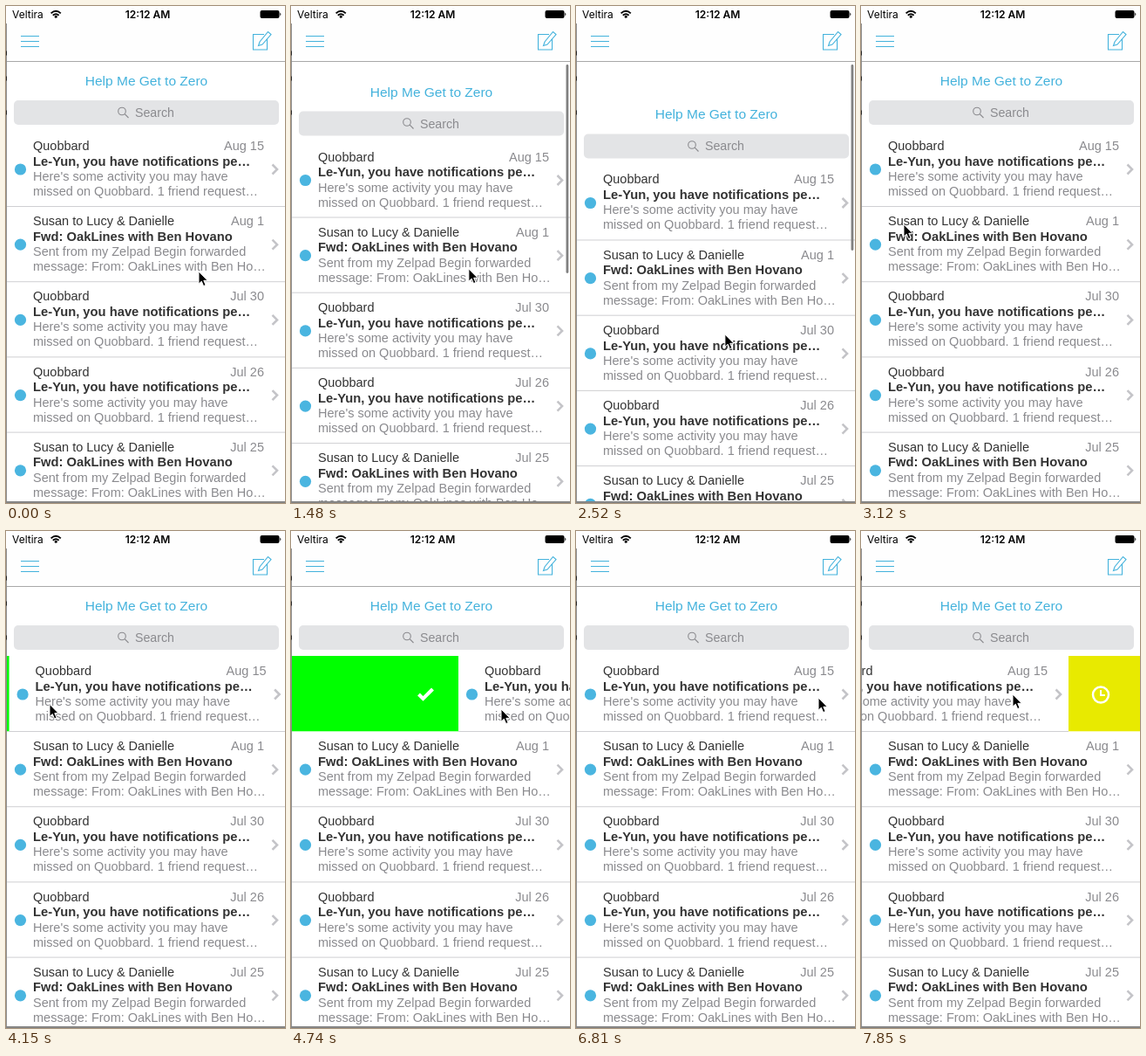
An HTML page that plays this animation: 320 by 569 pixels, repeating every 8000 ms.

```html
<!DOCTYPE html>
<html lang="en">
<head>
<meta charset="utf-8">
<title>Inbox swipe</title>
<style>
  html, body { margin: 0; width: 100%; height: 100%; overflow: hidden; background: #fff; }
  svg { display: block; width: 100%; height: 100%; }
  text { font: 14.5px "Liberation Sans", Arial, sans-serif; fill: #8a8a8e; }
  .status { font: 12px Inter, sans-serif; fill: #000; }
  .clock { font-weight: 600; text-anchor: middle; }
  .title { font-size: 15.5px; fill: #43b2dc; text-anchor: middle; }
  .search { font-size: 14.2px; }
  .sender { fill: #333; }
  .subject { font-size: 14.75px; font-weight: bold; fill: #333; }
  .date { text-anchor: end; }
  .line { fill: none; stroke: #43b2dc; stroke-width: 1.1; }
  .mark { fill: none; stroke: #fff; }
</style>
</head>
<body>
<svg viewBox="0 0 320 569">
  <rect width="320" height="569" fill="#fff"/>

  <g id="list">
    <text class="title" x="161" y="91">Help Me Get to Zero</text>
    <rect x="9" y="108" width="304" height="28" rx="5" fill="#e3e4e6"/>
    <g fill="none" stroke="#8a8a8e" stroke-width="1.1">
      <circle cx="133" cy="120.5" r="4.3"/>
      <path d="M136.2 123.7L140.5 128"/>
    </g>
    <text class="search" x="148" y="127">Search</text>
    <g id="rows"></g>
    <g id="done">
      <rect id="green" x="1" y="143" height="86.3" fill="#0f0"/>
      <path id="check" class="mark" stroke-width="4" d="M-8 0L-3 5L8 -6"/>
    </g>
    <g id="later">
      <rect id="yellow" y="143" height="86.3" fill="#e8ea00"/>
      <g id="timer" class="mark" stroke-width="2.5">
        <circle r="9"/>
        <path stroke-width="2" d="M0 -5.5V.5H5"/>
      </g>
    </g>
  </g>

  <rect id="bar" x="315.5" y="67" width="2.8" rx="1.4" fill="#808080"/>

  <rect width="320" height="63" fill="#fefefe"/>
  <path d="M0 63.5H320" stroke="#a8a8a8"/>
  <path d="M.5 20V569" stroke="#8c8c8c"/>
  <path d="M0 54h1M0 83h1M0 122h1" stroke="#222" stroke-width="5"/>
  <rect y="567" width="320" height="2" fill="#858585"/>

  <text class="status" x="7" y="13.5">Veltira</text>
  <path d="M51.6 8.4Q57.2 3.2 62.8 8.4M53.8 10.8Q57.2 7.6 60.6 10.8"
        fill="none" stroke="#000" stroke-width="1.9"/>
  <circle cx="57.2" cy="12.2" r="1.5"/>
  <text class="status clock" x="162.5" y="13.5">12:12 AM</text>
  <rect x="291.5" y="5" width="22" height="9" rx="2"/>
  <path d="M314.3 7.6Q316.4 9.5 314.3 11.4Z"/>

  <path class="line" d="M17 34.5h21m-21 6h21m-21 6h21"/>
  <path class="line" d="M296 32.5H283.5V50H299.5V38M289.5 45.5L291 41L300.5 29.5L304 32.5L294 44Z"/>

  <path id="cursor" d="M0 0V14.2L3.3 11.2L5.6 16.6L8.1 15.5L5.8 10.3H10.2Z"
        stroke="#fff" stroke-linejoin="round"/>
</svg>

<script>
const $ = id => document.getElementById(id);
const LOOP = 8000, TOP = 143, ROW = 86.2;

const activity = ['Quobbard', 'Le-Yun, you have notifications pe…',
  "Here's some activity you may have", 'missed on Quobbard. 1 friend request…'];
const forward = ['Susan to Lucy &amp; Danielle', 'Fwd: OakLines with Ben Hovano',
  'Sent from my Zelpad Begin forwarded', 'message: From: OakLines with Ben Ho…'];
const mails = [[activity, 'Aug 15'], [forward, 'Aug 1'], [activity, 'Jul 30'],
  [activity, 'Jul 26'], [forward, 'Jul 25']];

$('rows').innerHTML = mails.map(([[sender, subject, first, second], date], i) => `
  <g transform="translate(0 ${TOP + i * ROW})"><g class="mail">
    <circle cx="16.5" cy="44" r="6.6" fill="#4ab5e0"/>
    <text class="sender" x="31" y="22">${sender}</text>
    <text class="date" x="296" y="22">${date}</text>
    <text class="subject" x="31" y="39.7">${subject}</text>
    <text x="31" y="57">${first}</text>
    <text x="31" y="74">${second}</text>
    <path d="M305.5 38.5l5.5 5.5l-5.5 5.5" fill="none" stroke="#c4c4c8" stroke-width="2.6"/>
    <path d="M1 86.5H320" stroke="#cfcfd2"/>
  </g></g>`).join('');
const swiped = document.querySelector('.mail');

// The screen refreshes only in bursts, about every 146 ms.
const STEP = 146;
const bursts = [[900, 1480], [1630, 1930], [2080, 3120], [3270, 3710],
  [4010, 4740], [4880, 5330], [6080, 6810], [7260, 7850]];

function refreshTime(now) {
  const burst = bursts.findLast(([start]) => start <= now + 0.5);
  if (!burst) return 0;
  const [start, end] = burst;
  const step = (end - start) / Math.round((end - start) / STEP);
  return Math.min(end, start + Math.floor((now - start + 0.5) / step) * step);
}

// Linear track of [time, value] keys
function track(keys, time) {
  const next = keys.findIndex(([t]) => t > time);
  if (next < 0) return keys.at(-1)[1];
  if (next === 0) return keys[0][1];
  const [t0, v0] = keys[next - 1], [t1, v1] = keys[next];
  return v0 + (v1 - v0) * (time - t0) / (t1 - t0);
}

const cursorX = [[760, 221], [1335, 206], [2080, 195], [2230, 195], [3120, 49], [3710, 38],
  [4010, 50], [4740, 241], [5330, 282], [6080, 282], [6810, 278], [7260, 278], [7850, 174]];
const cursorY = [[760, 304], [1190, 281], [1335, 283], [1480, 301], [2080, 400], [2230, 401],
  [3120, 250], [3710, 196], [4740, 204], [5330, 195], [6810, 191], [7850, 187]];
const pullKeys = [[1190, 0], [1335, 2], [1480, 12.5], [2080, 65], [2230, 64],
  [2380, 38], [2526, 13], [2823, 0]];
const swipeKeys = [[4000, 0], [4740, 191], [5330, 232], [6080, 232], [6226, 110],
  [6372, 28], [6664, 0], [7260, 0], [7850, -82]];

const move = (node, x, y) => node.setAttribute('transform', `translate(${x} ${y})`);
const show = (node, on) => node.setAttribute('visibility', on ? 'visible' : 'hidden');

function draw() {
  const time = refreshTime(performance.now() % LOOP);
  const pull = track(pullKeys, time), swipe = track(swipeKeys, time);
  move($('cursor'), track(cursorX, time), track(cursorY, time));
  move($('list'), 0, pull);
  move(swiped, swipe, 0);

  show($('bar'), pull > 0);
  $('bar').setAttribute('height', 251.5 - pull);
  $('bar').setAttribute('opacity', Math.min(1, pull / 5));

  show($('done'), swipe > 0);
  $('green').setAttribute('width', Math.max(0, swipe));
  move($('check'), swipe - 36.5, TOP + 44);

  show($('later'), swipe < 0);
  $('yellow').setAttribute('x', 320 + swipe);
  $('yellow').setAttribute('width', Math.max(0, -swipe));
  move($('timer'), 357 + swipe, TOP + 44.5);
  requestAnimationFrame(draw);
}
draw();
</script>
</body>
</html>
```
